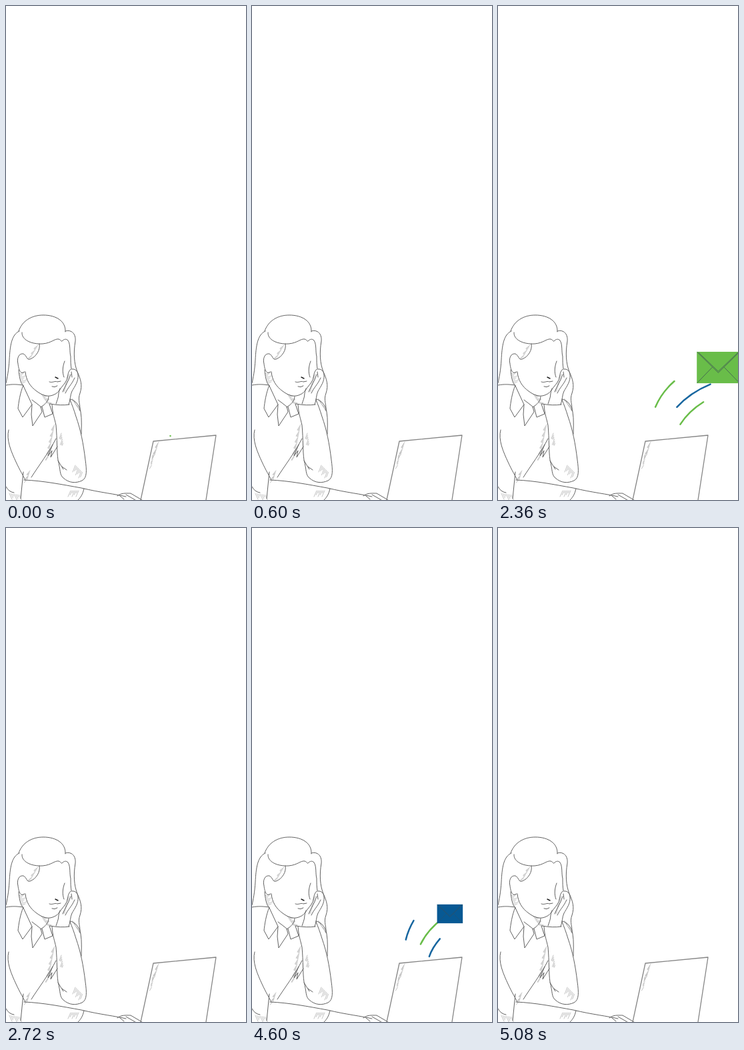
These frames come from a looping animation (360x740 px, 6.56 s). An HTML page:

```html
<!DOCTYPE html>
<html lang="en">
<head>
<meta charset="utf-8">
<style>
  html, body { margin: 0; width: 100%; height: 100%; overflow: hidden; background: #fff; }
  svg { display: block; width: 360px; height: 740px; }
  path { fill: none; stroke-linecap: round; stroke-linejoin: round; }
  #woman { stroke: #626262; stroke-width: 1; }
  #laptop { stroke: #858585; stroke-width: 1.3; }
  #hatching { stroke: #aaa; stroke-width: .7; }
  #trails { stroke-width: 2.5; }
</style>
</head>
<body>
<svg viewBox="0 0 360 740">
  <g id="hatching"></g>
  <g id="woman">
    <!-- hair -->
    <path d="M19 487C24 472 38 463 56 463C75 463 90 472 89 488M20 487C8 492 6 510 5 530C4 546 2 556 0 565"/>
    <path d="M24 489C23 500 38 507 55 506C68 505 73 498 79 499C83 500 82 503 84 502C87 499 90 498 93 501C97 507 95 517 97 525C97 532 97 538 98 543"/>
    <path d="M89 487C99 484 105 492 104 502C101 520 102 535 107 548C112 559 115 568 111 580C107 590 112 598 111 606"/>
    <path d="M50 506C52 515 45 526 36 529C31 531 31 523 26 521C19 520 16 528 18 536C19 545 22 553 28 548M19 545C20 555 21 564 26 569"/>
    <!-- face -->
    <path d="M29 548C30 560 36 570 46 577C54 583 62 586 70 583C76 581 80 577 81 573M88 532C85 540 84 548 87 556M65 563C70 565 73 561 77 563L82 562M69 570Q73 572 77 569"/>
    <path stroke="#222" stroke-width="1.5" d="M74 556L78 558"/>
    <!-- hand and raised arm -->
    <path d="M97 544C91 550 94 556 90 562C86 569 80 573 79 580C79 587 76 592 75 596M98 544C104 543 108 547 108 553C109 562 103 570 99 577C96 583 97 590 94 597M97 552C94 562 88 570 85 578M103 557C98 568 93 571 89 580M98 548L99 556"/>
    <path d="M66 596Q82 599 95 597M69 597C70 612 73 618 75 628C77 650 76 666 78 680C82 695 80 702 86 707C95 715 105 715 114 711C122 707 121 695 119 680C116 655 112 635 105 615C102 605 99 597 96 590"/>
    <path d="M96 589C104 590 110 598 112 608C114 620 113 630 113 641M78 681L86 694M84 690L91 695"/>
    <!-- shirt -->
    <path d="M0 568C10 566 18 567 26 568C21 580 19 594 18 603L25 616L39 597L26 569M39 597L38 612L40 629L54 608L52 600L39 590M54 600L58 616L70 611L65 596M52 601C60 596 64 591 64 585"/>
    <path d="M4 635C0 650 8 668 15 683C21 696 26 704 29 710M75 648C65 668 48 690 38 706M70 657L63 674L69 666L67 676L77 660"/>
    <path d="M27 710C55 711 85 717 113 722C142 729 164 731 180 735M26 698L22 738M0 720Q4 728 12 729M117 723C115 732 112 736 108 740"/>
    <path d="M167 734C173 729 180 730 187 730L204 740M170 733L177 739M180 732L194 740"/>
  </g>
  <path id="laptop" d="M202 740L221 652L315 643L300 740"/>
  <g id="trails">
    <path d="M246.5 644C252 604 300 560 372 554"/>
    <path d="M230 620C238 582 268 545 330 530S385 516 410 514"/>
    <path d="M265 645C270 625 298 584 362 574S392 568 410 566"/>
  </g>
  <g id="envelope">
    <rect x="-45" y="-33" width="90" height="66"/>
    <path stroke="#3b4d55" d="M-44 -32L0 11L44 -32M-41 -31L0 8L41 -31M-44 32L-13 0M44 32L13 0"/>
  </g>
</svg>
<script>
  const LOOP = 6560, STEP = 40, BLUE = '#17669f', GREEN = '#69bd49';
  const bursts = [
    { from: 0, to: 600, zero: 0, main: GREEN, side: BLUE, paper: '#075994' },
    { from: 2160, to: 2720, zero: 2120, main: BLUE, side: GREEN, paper: GREEN },
    { from: 4480, to: 5080, zero: 4440, main: GREEN, side: BLUE, paper: '#075994' }
  ];
  const $ = id => document.getElementById(id);
  const trails = [...$('trails').children], envelope = $('envelope');

  // Rows of short strokes: start, spacing, count, stroke vector
  function hatch(x, y, dx, dy, count, sx, sy) {
    let d = '';
    for (let i = 0; i < count; i++) {
      const k = 1 - .3 * (i % 3);
      d += `M${x + i * dx} ${y + i * dy}l${sx * k} ${sy * k}`;
    }
    const path = document.createElementNS('http://www.w3.org/2000/svg', 'path');
    path.setAttribute('d', d);
    $('hatching').append(path);
  }
  hatch(48, 508, -1.4, 2.4, 8, -6, 5);
  hatch(20, 551, .6, 2, 8, 7, -3);
  hatch(53, 582, 1.2, 1.8, 8, 8, 2);
  hatch(73, 627, -.6, 3, 17, -5, 8);
  hatch(36, 696, -.6, 2, 7, -5, 6);
  hatch(99, 588, 1.3, 2, 9, 5, 7);
  hatch(83, 640, .5, 3, 6, -3, 8);
  hatch(104, 688, 1.5, 1.5, 8, -4, 10);
  hatch(5, 730, 2.5, .4, 7, 4, 9);
  hatch(97, 726, 2, 0, 7, -4, 9);
  hatch(95, 552, -.8, 3, 9, -4, 5);
  hatch(229, 653, -.9, 3, 7, -5, 8);
  hatch(222, 670, -.6, 3, 7, -3, 5);

  function drawTrail(path, color, head, tail) {
    const length = head - tail;
    path.style.display = length < 0 ? 'none' : '';
    path.style.stroke = color;
    path.style.strokeDasharray = `${Math.max(length, .01)} 999`;
    path.style.strokeDashoffset = -tail;
  }

  const tailAt = (u, start, reach) => reach * Math.max(0, (u - start) / (320 - start)) ** 1.6;

  function draw(t) {
    const burst = bursts.find(b => t >= b.from && t < b.to);
    $('trails').style.display = envelope.style.display = burst ? '' : 'none';
    if (!burst) return;
    const u = t - burst.zero;
    drawTrail(trails[0], burst.main, .46 * u, tailAt(u, 40, 84));
    for (const side of trails.slice(1))
      drawTrail(side, burst.side, .43 * (u - 80), tailAt(u, 120, 46));

    const q = Math.max(0, (u - 40) / 280);
    const x = 262 + 60 * q + 50 * q * q, y = 640 - 155 * q + 24 * q * q;
    envelope.setAttribute('transform', `translate(${x} ${y}) scale(${Math.min(1, q)})`);
    envelope.style.fill = burst.paper;
  }

  function tick() {
    draw(Math.floor(performance.now() % LOOP / STEP) * STEP);
    requestAnimationFrame(tick);
  }
  tick();
</script>
</body>
</html>
```
